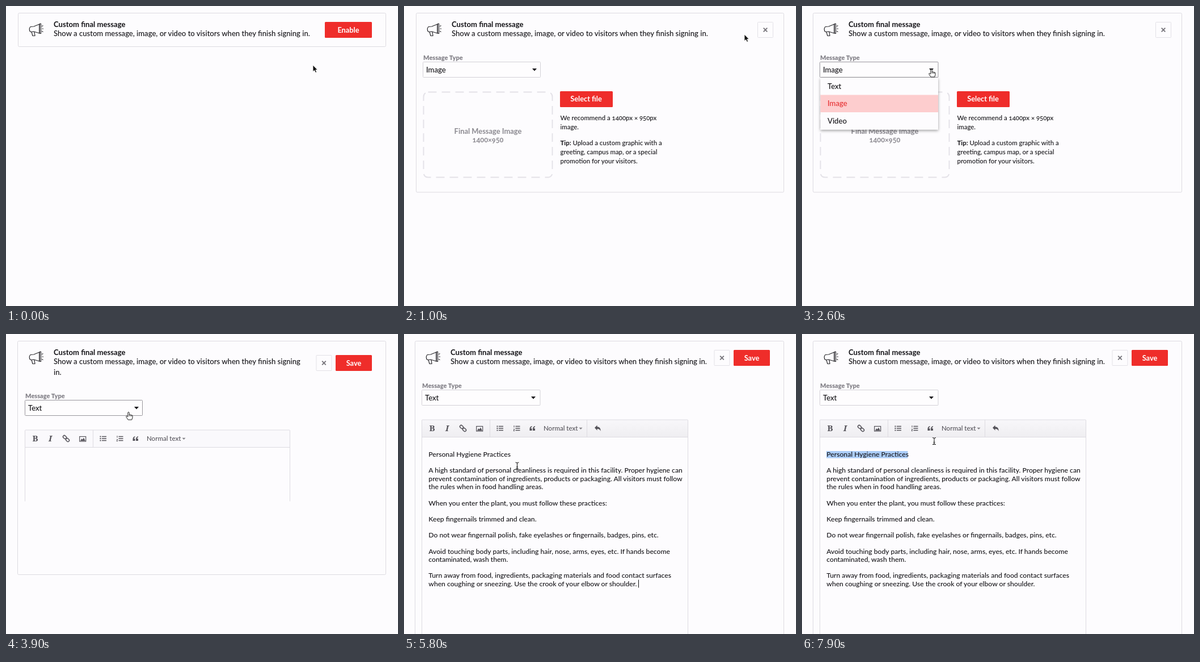
These frames come from a looping animation (691x528 px, 8 s). An HTML page:

```html
<!DOCTYPE html>
<html lang="en">
<head>
<meta charset="utf-8">
<title>Custom final message</title>
<style>
  html, body { margin: 0; width: 100%; height: 100%; overflow: hidden; background: #fdfcfe; }
  svg { display: block; width: 691px; height: 528px; font: 500 13.1px Lato, "Open Sans", sans-serif; fill: #151418; }
  .bold { font-weight: 700; }
  .mid { text-anchor: middle; }
  .white { fill: #fff; font-weight: 700; font-size: 12.8px; text-anchor: middle; }
  .gray { fill: #8b8990; font-weight: 700; }
  .label { fill: #85838a; font-weight: 900; font-size: 11px; }
  .small { font-size: 11.4px; }
  .body { font-size: 12.15px; }
  .red { fill: #ef2d2a; }
  .line { fill: none; stroke: #dddbe1; }
  .ink { fill: none; stroke: #2a292d; stroke-width: 1.2; stroke-linejoin: round; stroke-linecap: round; }
  .tool { fill: none; stroke: #55535a; stroke-width: 1.5; }
  .serif { font: 700 15px "Noto Serif", "Liberation Serif", serif; fill: #55535a; }
  .old { font-variant-numeric: oldstyle-nums; }
</style>
</head>
<body>
<svg viewBox="0 0 691 528">
  <defs>
    <clipPath id="clip"><rect id="clipRect" width="691" height="528"/></clipPath>
    <filter id="shadow" x="-10%" y="-10%" width="120%" height="130%">
      <feDropShadow dx="0" dy="2" stdDeviation="2.5" flood-opacity=".38"/>
    </filter>
    <linearGradient id="shade" x2="0" y2="1">
      <stop stop-color="#f8f7fa"/>
      <stop offset="1" stop-color="#efeef1"/>
    </linearGradient>
  </defs>

  <rect id="card" class="line" y="12.5" rx="2"/>

  <g id="header">
    <g class="ink">
      <path d="M41 36.5 L47 36 L57 32 V48 L47 45 L41 45.5 Q37.5 41 41 36.5Z"/>
      <path d="M57 31.500 L59.500 31 V48.500 L57 48Z M43 45.500 L45 52.500 H49 L48 45.500"/>
      <path d="M61.500 35.500 l1.500 -.8 M62 40 h1.500 M61.500 44.500 l1.500 .8"/>
    </g>
    <text class="bold" x="82" y="36.500">Custom final message</text>
    <text x="82" y="53.300">Show a custom message, image, or video to visitors when they finish signing<tspan id="lastWord"> in.</tspan></text>
    <text id="wrapped" x="82" y="71.500">in.</text>
  </g>

  <g id="enable">
    <rect class="red" x="562" y="28" width="83" height="28" rx="1.500"/>
    <text class="white" x="603.500" y="46.500">Enable</text>
  </g>
  <g id="close">
    <rect x="-13.500" y="28.500" width="27" height="27" rx="1" fill="none" stroke="#e3e1e7"/>
    <path d="M-3.300 38.700 l6.600 6.600 m0 -6.600 l-6.600 6.600" fill="none" stroke="#77757b" stroke-width="1.900"/>
  </g>
  <g id="save">
    <rect class="red" x="581" y="28" width="64" height="28" rx="1.500"/>
    <text class="white" x="613" y="46.500">Save</text>
  </g>

  <g clip-path="url(#clip)">
    <g id="content">
      <text class="label" x="32" y="95">Message Type</text>
      <rect id="select" x="31.500" y="98.500" height="27" rx="1" fill="#fff" fill-opacity=".6"/>
      <text id="choice" x="37" y="116.500"></text>
      <path d="M224 110 h8 l-4 4.500z"/>

      <g id="imagePane">
        <rect x="32.500" y="151.500" width="227" height="150" rx="8" fill="none" stroke="#e4e2e8" stroke-width="2" stroke-dasharray="15 9"/>
        <text class="gray mid" x="146" y="224.700" font-size="12.9">Final Message Image</text>
        <text class="gray mid old" x="146" y="239.500" font-size="12.7">1400×950</text>
        <rect class="red" x="273" y="150" width="93" height="28" rx="1.500"/>
        <text class="white" x="319" y="168.300">Select file</text>
        <g class="small">
          <text class="old" x="273.500" y="200.500">We recommend a 1400px × 950px</text>
          <text x="273.500" y="216.500">image.</text>
          <text x="273.500" y="244.700"><tspan class="bold">Tip:</tspan> Upload a custom graphic with a</text>
          <text x="273.500" y="260.700">greeting, campus map, or a special</text>
          <text x="273.500" y="276.700">promotion for your visitors.</text>
        </g>
      </g>

      <g id="editor">
        <rect id="toolbar" x="32" y="151" height="30"/>
        <path id="frame" class="line"/>
        <text class="serif mid" x="49.500" y="171.300">B</text>
        <text class="serif mid" x="76" y="171.300" style="font-style:italic">I</text>
        <g class="tool">
          <rect x="-3.300" y="-2.300" width="6.600" height="4.600" rx="2.300" transform="translate(101.500 163.500) rotate(45)"/>
          <rect x="-3.300" y="-2.300" width="6.600" height="4.600" rx="2.300" transform="translate(106.500 168.500) rotate(45)"/>
          <rect x="127.700" y="162.500" width="11" height="8.500" stroke-width="1.200"/>
          <path d="M167 162.500 h8 M167 166 h8 M167 169.500 h8 M196.500 162.500 h8 M196.500 166 h8 M196.500 169.500 h8"/>
          <path d="M163.500 162.500 h2 M163.500 166 h2 M163.500 169.500 h2" stroke-width="1.800"/>
          <path d="M194 161 v3.500 M193 167.500 h1.800 l-1.800 3 h2" stroke-width="1"/>
        </g>
        <g fill="#55535a">
          <path d="M129 170 l2.500 -4 1.500 2 2 -3.500 2.800 5.500z"/>
          <path d="M225.500 162 q-4 1 -4 5 v3 h4 v-3.800 h-2 q0 -1.700 2 -2.600z"/>
          <path d="M231 162 q-4 1 -4 5 v3 h4 v-3.800 h-2 q0 -1.700 2 -2.600z"/>
          <text x="246" y="170" font-size="11.5">Normal text</text>
          <path d="M308.500 164.800 h6 l-3 3.200z" opacity=".7"/>
        </g>
        <g id="undo">
          <path class="line" d="M322.500 151 v30"/>
          <path d="M336 165 l4.500 -4.500 v2.700 q6.500 0 6 7.800 q-1.500 -4.300 -6 -4 v2.700z" fill="#55535a"/>
        </g>
        <rect id="highlight" x="43" y="206" width="143.500" height="12.500" fill="#abcdf8"/>
        <g id="document" class="body"></g>
        <path id="caret" d="M0 0 v14" stroke="#111" stroke-width="1"/>
      </g>
    </g>
  </g>

  <g id="menu">
    <rect x="32.500" y="126" width="207.500" height="91.500" fill="#fdfcfe" filter="url(#shadow)"/>
    <rect id="hover" x="32.500" width="207.500" height="30.500" fill="#fdcdce"/>
    <g id="options"></g>
  </g>

  <g id="pointer">
    <path id="arrow" d="M0 0 V11.500 L2.600 9.200 L4.600 13.300 L6.600 12.400 L4.800 8.500 H8.200Z" fill="#111" stroke="#fff" stroke-width=".8"/>
    <path id="hand" d="M-1.200 1.200 Q0 -.8 1.200 1.200 V5 Q2.600 4 3.200 5.300 Q4.700 4.500 5.200 5.900 Q6.900 5.300 7 7.200 V10 L5.700 14 H-.8 L-4.200 8.800 Q-4.300 6.700 -2.700 7.500 L-1.200 9Z M1.200 5 v2.500 M3.200 5.500 v2.200 M5.200 6 v2" fill="#fff" stroke="#222" stroke-width="1"/>
    <path id="beam" d="M-3 -6 Q0 -6 0 -4 V4 Q0 6 -3 6 M3 -6 Q0 -6 0 -4 M3 6 Q0 6 0 4 M-1.500 2 h3" fill="none" stroke="#222" stroke-width="1.100"/>
  </g>
</svg>
<script>
const LOOP = 8000, STEP = 100;
const $ = id => document.getElementById(id);
const show = (id, on) => { $(id).style.display = on ? '' : 'none'; };
const set = (id, attrs) => { for (const k in attrs) $(id).setAttribute(k, attrs[k]); };
const move = (id, x, y) => set(id, { transform: `translate(${x} ${y})` });

function addText(parent, x, y, string) {
  const el = document.createElementNS('http://www.w3.org/2000/svg', 'text');
  el.setAttribute('x', x);
  el.setAttribute('y', y);
  el.textContent = string;
  $(parent).append(el);
  return el;
}

const paragraphs = [
  ['Personal Hygiene Practices'],
  ['A high standard of personal cleanliness is required in this facility. Proper hygiene can',
   'prevent contamination of ingredients, products or packaging. All visitors must follow',
   'the rules when in food handling areas.'],
  ['When you enter the plant, you must follow these practices:'],
  ['Keep fingernails trimmed and clean.'],
  ['Do not wear fingernail polish, fake eyelashes or fingernails, badges, pins, etc.'],
  ['Avoid touching body parts, including hair, nose, arms, eyes, etc. If hands become',
   'contaminated, wash them.'],
  ['Turn away from food, ingredients, packaging materials and food contact surfaces',
   'when coughing or sneezing. Use the crook of your elbow or shoulder.']
];
let baseline = 216;
for (const lines of paragraphs) {
  lines.forEach((line, i) => addText('document', 43.3, baseline + i * 14.5, line));
  baseline += 28.3 + (lines.length - 1) * 14.5;
}
const options = ['Text', 'Image', 'Video'].map((name, i) => addText('options', 45, 145.7 + i * 30.5, name));

// Pointer stops: time, x, y
const stops = [
  [0, 541, 104], [500, 600, 50], [1800, 600, 50], [2500, 228, 111], [2700, 228, 111],
  [3300, 216, 137], [4400, 216, 137], [4700, 199.5, 232], [6200, 199.5, 232],
  [6700, 207, 211], [7700, 207, 211], [7900, 233, 188.5], [LOOP, 233, 188.5]
];
function pointerAt(t) {
  const i = stops.findIndex(s => s[0] > t);
  const [t0, x0, y0] = stops[i - 1], [t1, x1, y1] = stops[i];
  const p = (t - t0) / (t1 - t0), e = p * p * (3 - 2 * p);
  return [x0 + (x1 - x0) * e, y0 + (y1 - y0) * e];
}

function caretAt(t) {
  if (t >= 4900 && t < 5400) return [43.5, 205];
  if (t >= 5800 && t < 6300) return [413.5, 432.5];
  if (t >= 6700 && t < 7200) return [187, 205];
  return null;
}

function cardBottom(t) {
  if (t < 700) return 71.5;
  if (t < 1000) return 71.5 + 256 * [0.12, 0.4, 0.725][(t - 700) / STEP];
  if (t < 3900) return 327.8;
  return t < 4000 ? 423.5 : 560;
}

function draw(t) {
  const opened = t >= 700, textMode = t >= 3900, reflow = textMode && t < 4000;
  const inset = t < 1100 || reflow ? 2 : 0;
  const drop = reflow ? 18 : 0;
  const bottom = cardBottom(t);

  const left = reflow ? 20.5 : 19.5 + inset;
  set('card', { x: left, width: 669.5 - left, height: bottom - 12.5 });
  set('clipRect', { height: reflow ? 294.5 : Math.min(bottom, 528) });
  move('header', inset, 0);
  move('content', inset, drop);
  show('lastWord', !reflow);
  show('wrapped', reflow);
  show('enable', !opened);
  show('close', opened);
  show('save', textMode);
  move('close', textMode ? 560.5 : 637, drop / 2);
  move('save', 0, drop / 2);

  const menuOpen = t >= 2500 && t < 3900;
  const focused = t >= 2500 && t < 4900;
  show('content', opened);
  set('select', { width: 208.5 - inset * 0.75, stroke: focused ? '#99979d' : '#d3d1d7' });
  $('choice').textContent = textMode ? 'Text' : 'Image';
  show('imagePane', !textMode);
  show('editor', textMode);
  show('menu', menuOpen);
  const active = t < 3100 ? 1 : 0;
  set('hover', { y: 126 + active * 30.5 });
  options.forEach((el, i) => el.setAttribute('fill', i === active ? '#e62f31' : '#151418'));

  const pasted = t >= 5800;
  const right = 500.5 - inset;
  set('toolbar', { width: right - 32, fill: reflow ? '#faf9fc' : 'url(#shade)' });
  set('frame', { d: `M31.5 540 V152 q0 -1 1 -1 H${right - 1} q1 0 1 1 V540 M31.5 181.500 H${right} M151.500 151 v30` });
  show('undo', pasted);
  show('document', pasted);
  show('highlight', t >= 7200);
  const caret = caretAt(t);
  show('caret', caret);
  if (caret) move('caret', ...caret);

  const [x, y] = pointerAt(t);
  const beam = t >= 4500;
  const hand = !beam && (t < 700 ? y < 57 : x < 240);
  move('pointer', x, y);
  show('beam', beam);
  show('hand', hand);
  show('arrow', !beam && !hand);
}

const start = performance.now();
function tick() {
  const t = (performance.now() - start) % LOOP;
  draw(Math.floor(t / STEP) * STEP);
  requestAnimationFrame(tick);
}
tick();
</script>
</body>
</html>
```
